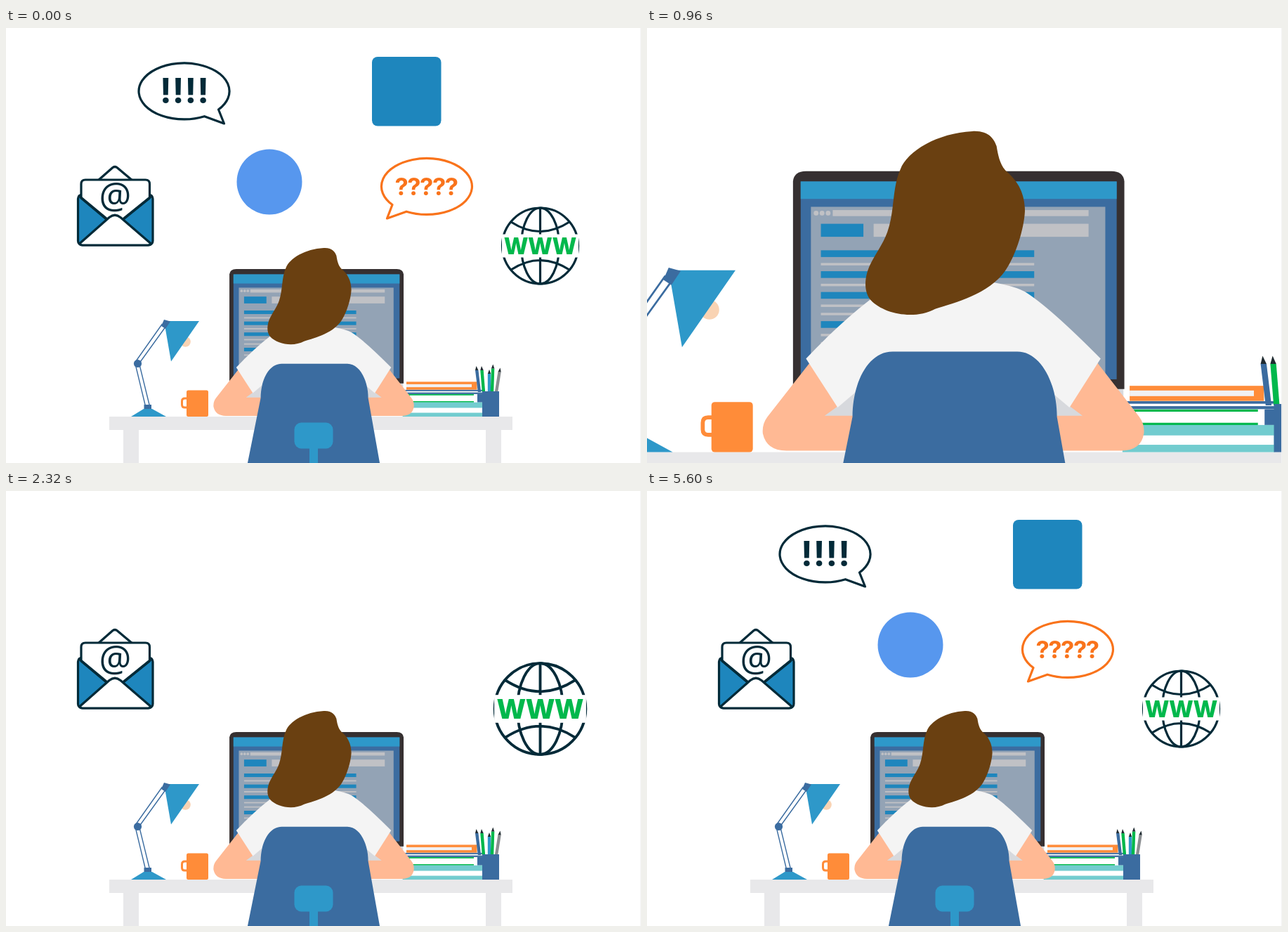
These frames come from a looping animation (904x619 px, 5.68 s). An HTML page:

```html
<!DOCTYPE html>
<html lang="en">
<head>
<meta charset="utf-8">
<title>At the desk</title>
<style>
  html, body { margin: 0; width: 100%; height: 100%; overflow: hidden; background: #fff; }
  svg { display: block; width: 904px; height: 619px; }
  text { text-anchor: middle; font-family: "Open Sans", "Noto Sans", sans-serif; }
  .mark { font-family: Inter, "Liberation Sans", sans-serif; font-weight: 700; }
  .navy { fill: #3b6ca0; }
  .sky { fill: #2e98c9; }
  .blue { fill: #1e86bd; }
  .grey { fill: #c0c1c5; }
  .orange { fill: #ff8c39; }
  .green { fill: #00b84c; }
  .teal { fill: #72cccf; }
  .white { fill: #fff; }
  .skin { fill: #ffb994; }
  .desk { fill: #e8e8ea; }
  .rod { stroke: #3b6ca0; stroke-width: 1.4; fill: none; }
  .ink { stroke: #022a38; stroke-width: 3.2; stroke-linejoin: round; fill: none; }
</style>
</head>
<body>
<svg viewBox="0 0 904 619">
  <g id="scene">
    <g class="desk">
      <rect x="147" y="553" width="574" height="19"/>
      <rect x="167" y="571" width="22" height="60"/>
      <rect x="683" y="571" width="22" height="60"/>
    </g>

    <g transform="matrix(.3478 0 0 .3478 287.1 324.1)">
      <path fill="#bfc0c4" d="M373 580H514L519 640H367Z"/>
      <path fill="#d7d9dd" d="M86.500 515H800V555Q800 588 767 588H119.500Q86.500 588 86.500 555Z"/>
      <path fill="#363031" d="M89 522.500V76Q91 54 117 54H774Q800 54 802 76V522.500Z"/>
      <rect class="navy" x="105.500" y="76" width="680" height="425.500"/>
      <rect class="sky" x="105.500" y="76" width="680" height="37.500"/>
      <circle class="navy" cx="449.600" cy="95.300" r="7.800"/>
      <g id="page">
        <rect fill="#93a3b5" x="127.500" y="130.500" width="633.500" height="360"/>
        <g class="grey">
          <circle cx="138.700" cy="144" r="5.200"/>
          <circle cx="151.500" cy="144" r="5.200"/>
          <circle cx="164.500" cy="144" r="5.200"/>
          <rect x="174.500" y="137.500" width="550.500" height="13"/>
          <rect x="262.500" y="167" width="462.500" height="28"/>
        </g>
        <rect class="blue" x="149" y="167" width="91.500" height="28"/>
        <g id="lines"></g>
      </g>
    </g>

    <g id="books">
      <rect class="orange" x="570" y="503.400" width="100.500" height="11.300"/>
      <rect fill="#f1f1f3" x="570" y="506.900" width="93" height="4.200"/>
      <rect class="navy" x="564.300" y="514.900" width="114" height="6"/>
      <rect class="white" x="567.200" y="516.800" width="111" height="1.800"/>
      <rect class="white" x="572" y="521" width="100" height="12"/>
      <path class="green" d="M572 521H666V522.700H574.500V531H666V532.700H572Z"/>
      <rect class="navy" x="671" y="521" width="8" height="11.700"/>
      <rect class="teal" x="564.600" y="532.700" width="114" height="20.300"/>
      <rect class="white" x="568" y="540.500" width="110" height="7"/>
    </g>
    <g id="pencils"></g>
    <rect class="navy" x="678" y="517" width="24" height="36"/>

    <g id="lamp">
      <path class="rod" d="M184.500 480L198.500 538M190 479L204.500 538M185 474L222.500 421M190.500 476L228 424"/>
      <circle fill="#f9d3b3" cx="255.500" cy="446.500" r="7.300"/>
      <path class="sky" d="M225 417H275L235 474.500ZM178 553L196 542H208L228 553Z"/>
      <path class="navy" d="M225 415L234 417.500L227 428L221 424ZM196.500 536H207V542H196.500Z"/>
      <circle class="navy" cx="187.500" cy="477.500" r="5.600"/>
    </g>
    <g id="mug">
      <rect class="orange" x="257" y="515.500" width="31" height="37.500" rx="2.500"/>
      <path d="M258 527H254.500Q250.500 527 250.500 531V536Q250.500 540 254.500 540H258" fill="none" stroke="#ff8c39" stroke-width="3"/>
    </g>

    <g id="person">
      <g transform="matrix(.3478 0 0 .3478 287.1 324.1)">
        <path class="skin" d="M125 466L34 582Q22 598 24 618Q32 655 75 655H230V580H157L190 556Z"/>
        <path class="skin" d="M744 466L834 582Q846 598 844 618Q838 655 795 655H640V580H712L680 556Z"/>
        <path fill="#f4f4f4" d="M117 457Q190 380 255 330L400 250L520 293Q566 301 588 313Q640 345 751 457L684 562L610 500H258L185 562Z"/>
        <path fill="#6a4011" d="M475-32C510-34 522-15 527 0C530 18 534 40 547 53C572 74 588 100 588 140C586 180 568 232 552 258C520 316 440 336 395 350C350 374 285 362 256 331C240 312 243 280 255 255C266 232 282 212 292 185C308 140 302 90 320 50C335 10 400-28 475-32Z"/>
        <path class="navy" d="M157 880L217 582C217 510 250 442 303 442H572C622 442 657 510 657 582L710 880Z"/>
      </g>
      <rect class="sky" x="410.500" y="561.500" width="55" height="37" rx="10"/>
      <rect class="sky" x="432" y="597" width="12" height="40"/>
    </g>
  </g>

  <g id="mail" class="ink">
    <path class="white" d="M131 217L152 198.500Q155 196.500 158 198.500L180 217Z"/>
    <rect class="blue" x="102.500" y="237" width="106.500" height="72" rx="6"/>
    <path class="white" d="M107 242V222Q107 216 113 216H198.500Q204.500 216 204.500 222V242L166 273H144Z"/>
    <path class="white" d="M104.500 307L147 269.500Q155 263 163 269.500L206.500 307Q205 309 202 309H109Q106 309 104.500 307Z"/>
    <path d="M103 238L143.500 271.500M208.500 238L167 271.500"/>
    <text x="155.500" y="257" font-size="51" fill="#022a38" stroke="none">@</text>
  </g>

  <g id="globe">
    <g class="ink">
      <circle cx="760.500" cy="310" r="54"/>
      <ellipse cx="760.500" cy="310" rx="27" ry="54"/>
      <path d="M760.500 256V364M719 276Q760.500 303 802 276M719 344Q760.500 317 802 344"/>
    </g>
    <rect class="white" x="706" y="293.500" width="109" height="33"/>
    <text class="green" x="760.500" y="322" font-size="33" font-weight="800">WWW</text>
  </g>

  <g id="shout">
    <path class="ink" d="M282.500 125.700A64.500 40 0 1 1 302.500 116L310.500 136Z"/>
    <text class="mark" x="254.500" y="107" font-size="49.500" letter-spacing="1">!!!!</text>
  </g>

  <rect id="tile" class="blue" x="521" y="41" width="98.500" height="98.500" rx="8"/>

  <g id="ask">
    <path d="M570 261.200A64.500 40 0 1 0 550 251.500L542.500 271Z" fill="none" stroke="#f9731b" stroke-width="3.200" stroke-linejoin="round"/>
    <text class="mark" x="598" y="238" font-size="34.500" letter-spacing="-1.500" fill="#f9731b">?????</text>
  </g>

  <circle id="disc" cx="375" cy="219" r="46.500" fill="#5797ee"/>
  <rect x="903" width="1" height="619" fill="#f2f2f2"/>
</svg>
<script>
const LOOP = 5680, STEP = 80;
const $ = id => document.getElementById(id);

const bar = (y, h, cls) => `<rect class="${cls}" x="149" y="${y}" width="459" height="${h}"/>`;
$('lines').innerHTML =
  [224, 269, 313.7, 376.4, 456.4].map(y => bar(y, 14.5, 'blue')).join('') +
  [251.3, 296, 340.7, 358.5, 403.7, 421.3, 438.9].map(y => bar(y, 5.2, 'grey')).join('');

const pencil = ([x, y, foot, color]) => {
  const neck = x + 6 * (foot - x) / (518 - y);
  return `<path fill="${color}" d="M${neck - 2.2} ${y + 6}H${neck + 2.2}L${foot + 2.2} 518H${foot - 2.2}Z"/>
    <path fill="#1f2a30" d="M${x} ${y}L${neck + 2.2} ${y + 6}H${neck - 2.2}Z"/>`;
};
$('pencils').innerHTML = [
  [669.5, 481, 674, '#3b6ca0'], [677, 481, 680, '#00b84c'], [688, 486, 688, '#2e98c9'],
  [693.3, 478.5, 692, '#00b84c'], [703.5, 483.5, 698, '#8a8d90']
].map(pencil).join('');

// id, centre x, centre y, start, overshoot
const icons = [
  ['mail', 155.5, 253, 1800, 1],
  ['globe', 760.5, 310, 2080, 1.2],
  ['shout', 253.5, 93, 2680, 1.2],
  ['tile', 570.2, 90.2, 3280, 1.2],
  ['ask', 599, 228, 3880, 1.2],
  ['disc', 375, 219, 4480, 1.2]
];
const pageKeys = [[80, .3], [160, .7], [240, 1], [320, 1.047], [640, 1]];

function tween(keys, t) {
  if (t <= keys[0][0]) return keys[0][1];
  for (let i = 1; i < keys.length; i++) {
    const [t0, v0] = keys[i - 1], [t1, v1] = keys[i];
    if (t < t1) return v0 + (v1 - v0) * (t - t0) / (t1 - t0);
  }
  return keys[keys.length - 1][1];
}

function bezier(x1, y1, x2, y2, x) {
  const at = (a, b, u) => 3 * (1 - u) * (1 - u) * u * a + 3 * (1 - u) * u * u * b + u ** 3;
  let lo = 0, hi = 1;
  for (let i = 0; i < 24; i++) {
    const mid = (lo + hi) / 2;
    if (at(x1, x2, mid) < x) lo = mid; else hi = mid;
  }
  return at(y1, y2, lo);
}

function zoom(t) {
  if (t < 80 || t >= 1680) return 1;
  if (t <= 640) return 3.133;
  return 3.133 - 2.133 * bezier(.25, .34, .32, 1, (t - 640) / 1040);
}

function scaleAt(el, x, y, s) {
  el.setAttribute('transform', `translate(${x} ${y}) scale(${s}) translate(${-x} ${-y})`);
}

function show(el, on) {
  el.style.display = on ? '' : 'none';
}

function draw(t) {
  const opening = t < 80;
  scaleAt($('scene'), 440.2, 497, zoom(t));
  scaleAt($('page'), 444.2, 310.5, opening ? 1 : tween(pageKeys, t));
  show($('person'), opening || t >= 720);
  for (const [id, x, y, start, peak] of icons) {
    const el = $(id);
    const s = opening ? 1 : tween([[start, 0], [start + 240, peak], [start + 320, 1]], t);
    show(el, s > 0);
    scaleAt(el, x, y, s);
  }
}

const begin = performance.now();
function tick() {
  const t = (performance.now() - begin) % LOOP;
  draw(Math.floor(t / STEP) * STEP);
  requestAnimationFrame(tick);
}
document.querySelector('#shout text').setAttribute('fill', '#022a38');
tick();
</script>
</body>
</html>
```
